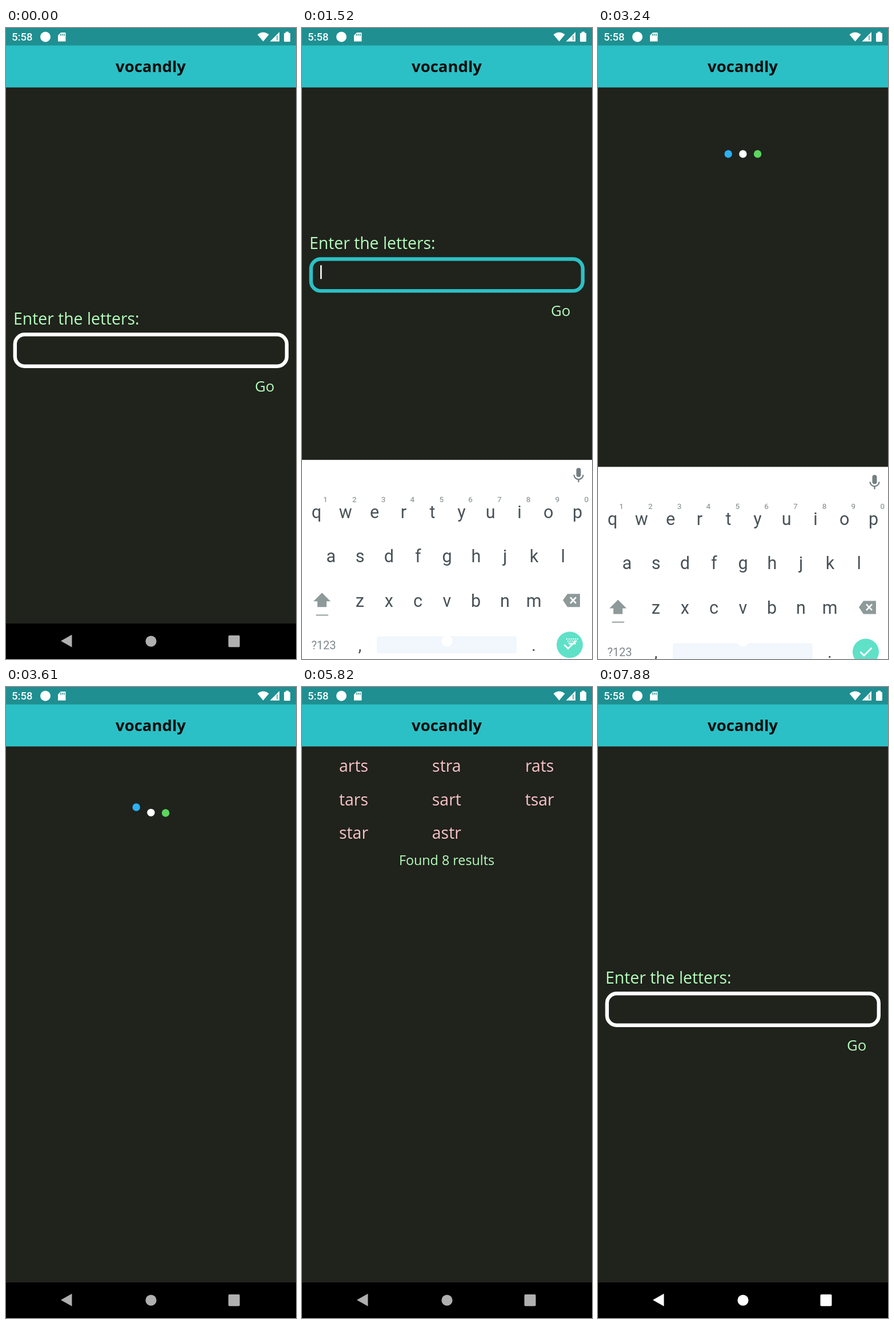
Recreate the animation shown at these times as an HTML page with a canvas. Size 508 by 1102 pixels, loop 8210 ms.

```html
<!DOCTYPE html>
<html lang="en">
<head>
<meta charset="utf-8">
<title>Word finder</title>
<style>
html, body { margin: 0; width: 100%; height: 100%; overflow: hidden; background: #20221c; }
canvas { display: block; width: 508px; height: 1102px; }
</style>
</head>
<body>
<canvas id="stage"></canvas>
<script>
const W = 508, H = 1102, LOOP = 8210, TICK = 10;
const BG = '#20221c', BAR = '#2bc0c5', STATUS = '#1f8f91', MINT = '#b4ffbc', PINK = '#fac4c8';
const GREY = '#8e9a9a', KEY = '#485256';
const KB_TOP = 675, KB_HEIGHT = H - KB_TOP;
const WORDS = ['arts', 'stra', 'rats', 'tars', 'sart', 'tsar', 'star', 'astr'];

const canvas = document.getElementById('stage');
const dpr = window.devicePixelRatio || 1;
canvas.width = W * dpr;
canvas.height = H * dpr;
const c = canvas.getContext('2d');
c.scale(dpr, dpr);

const progress = (t, from, to) => Math.min(1, Math.max(0, (t - from) / (to - from)));
const slideIn = (t) => 1 - Math.pow(1 - progress(t, 1380, 1660), 2.43);
const slideOut = (t) => Math.pow(progress(t, 3150, 3350), 1.93);

function rect(x, y, w, h, color) {
  c.fillStyle = color;
  c.fillRect(x, y, w, h);
}

function round(x, y, w, h, r, color) {
  c.beginPath();
  c.roundRect(x, y, w, h, r);
  c.fillStyle = color;
  c.fill();
}

function disc(x, y, r, color) {
  c.beginPath();
  c.arc(x, y, r, 0, Math.PI * 2);
  c.fillStyle = color;
  c.fill();
}

function poly(points, color) {
  c.beginPath();
  points.forEach(([x, y]) => c.lineTo(x, y));
  c.closePath();
  c.fillStyle = color;
  c.fill();
}

function line(points, width, color) {
  c.beginPath();
  points.forEach(([x, y], i) => i ? c.lineTo(x, y) : c.moveTo(x, y));
  c.lineWidth = width;
  c.strokeStyle = color;
  c.stroke();
}

function text(str, x, y, size, color, align = 'left', family = '"Open Sans"', weight = 400) {
  c.font = `${weight} ${size}px ${family}, sans-serif`;
  c.textAlign = align;
  c.fillStyle = color;
  c.fillText(str, x, y);
}

function drawBars() {
  rect(0, 0, W, 31, STATUS);
  rect(0, 30.5, W, 73.3, BAR);
  text('5:58', 10, 22, 18.5, '#fff', 'left', 'Roboto', 500);
  disc(69, 15.5, 9, '#fff');

  poly([[96, 8], [104.5, 8], [104.5, 23.5], [91, 23.5], [91, 13]], '#fff');
  for (let i = 0; i < 3; i++) rect(95.3 + i * 3, 10, 1.4, 3.6, STATUS);

  c.beginPath();
  c.moveTo(450.5, 23.5);
  c.lineTo(440.5, 11.5);
  c.quadraticCurveTo(450.5, 3.5, 460.5, 11.5);
  c.closePath();
  c.fillStyle = '#fff';
  c.fill();

  poly([[479, 7], [479, 23.5], [462.5, 23.5]], '#fff');
  line([[475, 13], [475, 21.5]], 1.3, STATUS);
  round(487, 8.5, 11, 15.5, 1.5, '#fff');
  rect(490, 6.5, 5, 3, '#fff');

  text('vocandly', 253.5, 77, 27.5, '#070b0b', 'center', '"Open Sans"', 700);
}

function drawForm(shift, active, typed) {
  c.save();
  c.translate(0, -shift);
  text('Enter the letters:', 13, 518, 28.4, MINT);
  c.beginPath();
  c.roundRect(15.8, 535.2, 476, 55.6, 17);
  c.lineWidth = 6.4;
  c.strokeStyle = active ? BAR : '#fff';
  c.stroke();
  if (typed) text(typed, 31, 572, 26, '#fff');
  if (active) {
    const x = typed ? 32 + c.measureText(typed).width : 32;
    rect(x, 546, 2.6, typed ? 34 : 24, '#fff');
  }
  text('Go', 436, 635, 25.8, MINT);
  c.restore();
}

function drawDots(t) {
  ['#2bb0f3', '#fff', '#5bd75e'].forEach((color, i) => {
    const p = progress(t, 3490 + i * 115, 3730 + i * 115);
    disc(228.2 + i * 25.7, 220 - 10 * Math.sin(p * Math.PI), 6.7, color);
  });
}

function drawResults() {
  WORDS.forEach((word, i) => {
    const col = i % 3, row = Math.floor(i / 3);
    text(word, 90.5 + col * 162.8, 148 + row * 58.6, 28.4, PINK, 'center');
  });
  text('Found 8 results', 253.5, 310.5, 23.3, MINT, 'center');
}

function keyRow(letters, x, y) {
  [...letters].forEach((ch, i) => text(ch, x + i * 50.8, y, 30.5, KEY, 'center', 'Roboto'));
}

function drawMic(x, y) {
  round(x - 4, y - 13, 8, 16, 4, '#737f82');
  c.beginPath();
  c.arc(x, y - 1, 8, 0, Math.PI);
  c.lineWidth = 2.2;
  c.strokeStyle = '#737f82';
  c.stroke();
  rect(x - 1.2, y + 7, 2.4, 5, '#737f82');
}

function drawKeyboard(offset, dividers) {
  c.save();
  c.translate(0, offset);
  rect(0, KB_TOP, W, 368, '#fff');
  rect(0, 1043, W, 59, '#000');
  c.globalAlpha = dividers;
  rect(178, 687, 1, 31, '#eceff0');
  rect(328, 687, 1, 31, '#eceff0');
  c.globalAlpha = 1;
  drawMic(484.5, 702);

  keyRow('qwertyuiop', 25.4, 776.5);
  keyRow('asdfghjkl', 50.8, 854);
  keyRow('zxcvbnm', 101.4, 932);
  [...'1234567890'].forEach((n, i) =>
    text(n, 41 + i * 50.8, 749, 13.5, '#7d878a', 'center', 'Roboto'));

  poly([[35, 907], [50, 922], [43, 922], [43, 932], [27, 932], [27, 922], [20, 922]], GREY);
  rect(24.5, 945, 21.5, 2.4, '#a5adad');
  poly([[457, 920], [465, 909], [487, 909], [487, 932], [465, 932]], GREY);
  line([[470, 915], [480, 925.5]], 2.6, '#fff');
  line([[480, 915], [470, 925.5]], 2.6, '#fff');

  text('?123', 38, 1005.5, 20, '#7f898c', 'center', 'Roboto');
  text(',', 101.5, 1009, 30, KEY, 'center', 'Roboto');
  text('.', 406, 1009, 30, KEY, 'center', 'Roboto');
  round(131, 983, 245, 30, 4, '#f1f7fc');
  disc(469, 998, 23, '#5fe1c8');
  line([[459.5, 998], [466, 1004.5], [479.5, 991]], 2.8, '#fff');
  c.restore();
}

function drawNav(color, turn, keyboardIcon) {
  c.save();
  c.translate(106.5, 1070.5);
  c.rotate(-turn * Math.PI / 2);
  poly([[-10.5, 0], [9, -11], [9, 11]], color);
  c.restore();
  disc(254, 1071, 9.6, color);
  round(389.5, 1060.8, 20, 20.4, 2, color);
  if (!keyboardIcon) return;
  for (let row = 0; row < 3; row++) {
    for (let i = 0; i < 6 - row; i++) rect(463 + row * 1.8 + i * 3.7, 1066 + row * 3.7, 2, 2, color);
  }
  rect(468, 1074.5, 11, 2, color);
}

function drawPressRipple(t) {
  const p = progress(t, 6940, 7300);
  if (p <= 0 || p >= 1) return;
  const grow = Math.min(1, p * 2.2);
  c.globalAlpha = 0.2 * Math.min(1, 2 - 2 * p);
  round(107 - 46 * grow, 1071 - 31 * grow, 92 * grow, 62 * grow, 31 * grow, '#fff');
  c.globalAlpha = 1;
}

function drawPage(t) {
  if (t < 3150) {
    const count = [2270, 2450, 2630, 2810].filter(at => t >= at).length;
    drawForm(181 * slideIn(t - 24), t >= 1210, WORDS[0].slice(0, count));
  } else if (t < 4000) {
    drawDots(t);
  } else {
    const back = progress(t, 7130, 7350);
    c.globalAlpha = progress(t, 3970, 4120) * (1 - back);
    drawResults();
    c.globalAlpha = back;
    if (back > 0) drawForm(0, false, '');
    c.globalAlpha = 1;
  }
}

function draw(t) {
  rect(0, 0, W, H, BG);
  drawPage(t);
  drawBars();
  rect(0, 1040, W, 62, '#000');

  const shown = slideIn(t) - slideOut(t);
  const moving = shown > 0 && shown < 1;
  const dividers = progress(t, 1600, 1660) - progress(t, 3150, 3180);
  if (shown > 0) drawKeyboard((1 - shown) * KB_HEIGHT, dividers);
  drawPressRipple(t);
  const turn = progress(t, 1380, 1560) - progress(t, 3150, 3330);
  drawNav(moving || t >= 6940 ? '#fff' : '#b0b0b0', turn, shown > 0 && t < 3180);
}

const start = performance.now();
function frame() {
  const t = Math.round((performance.now() - start) / TICK) * TICK;
  draw(t % LOOP);
  requestAnimationFrame(frame);
}
draw(0);
requestAnimationFrame(frame);
</script>
</body>
</html>
```
